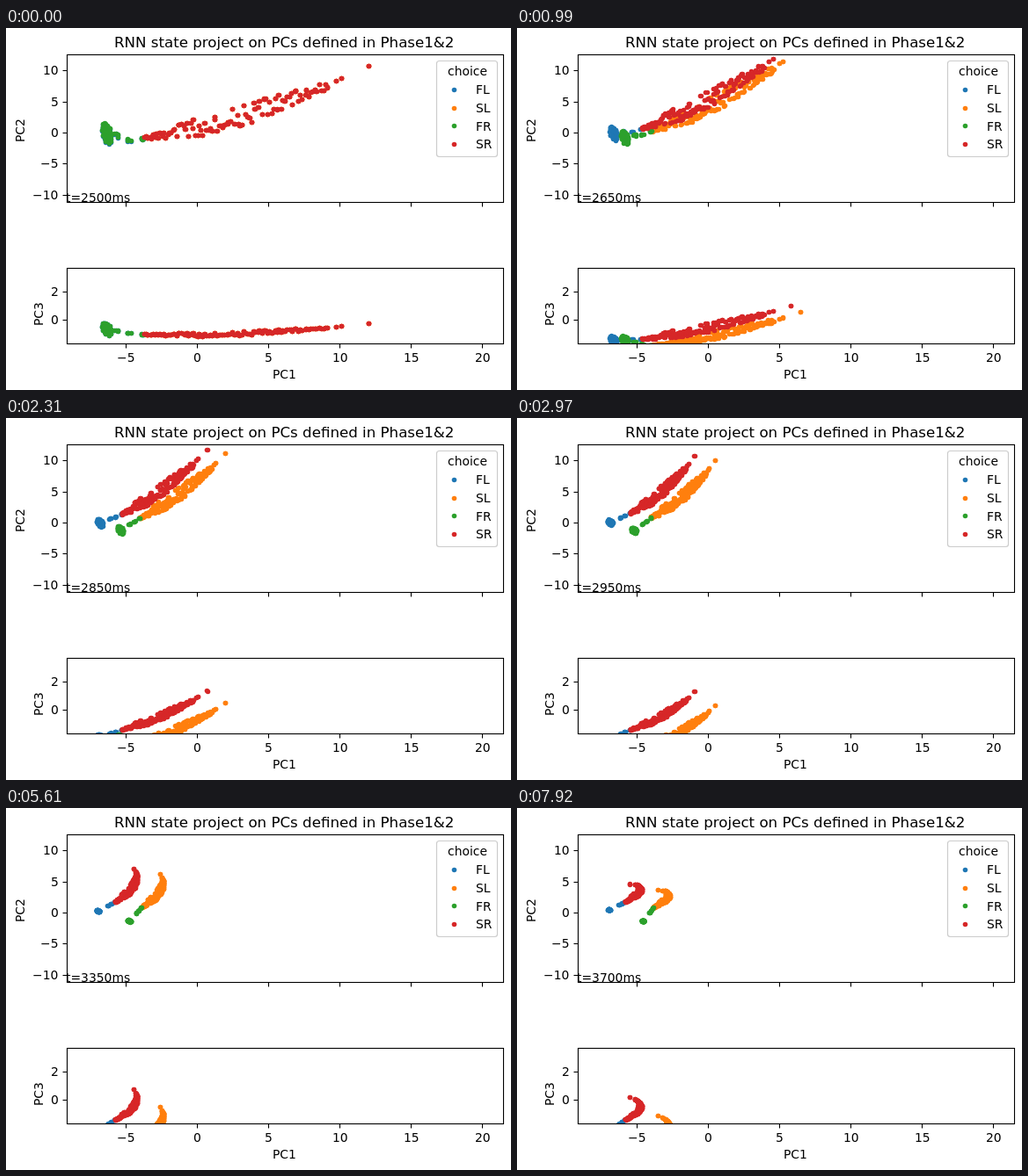
Write an HTML page with a canvas that moves like this. It is 574 px wide and 412 px high and loops after 8 s.

```html
<!DOCTYPE html>
<html lang="en">
<head>
<meta charset="utf-8">
<title>RNN state projection</title>
<style>
  html, body { margin: 0; width: 574px; height: 412px; overflow: hidden; background: #fff; }
  canvas { display: block; }
</style>
</head>
<body>
<canvas id="stage" width="574" height="412"></canvas>
<script>
const ctx = document.getElementById('stage').getContext('2d');
const LOOP = 8000, STEP = 330;
const FONT = '13.89px "DejaVu Sans", sans-serif';
const TITLE_FONT = '16.67px "DejaVu Sans", sans-serif';
const COLORS = { FL: '#1f77b4', SL: '#ff7f0e', FR: '#2ca02c', SR: '#d62728' };
const LEFT = 69.5, WIDTH = 496;
const TOP_AXES = { y: 30.5, h: 168 }, LOW_AXES = { y: 273.5, h: 86 };

let seed = 7;
function random() {
  seed = (seed * 16807) % 2147483647;
  return seed / 2147483647;
}
const signed = () => random() * 2 - 1;
const times = (count, make) => Array.from({ length: count }, (_, i) => make(i));

const mix = (a, b, w) => a + (b - a) * w;
const mixPoints = (a, b, w) => a.map((value, i) => mix(value, b[i], w));
// Parabola through a, b, c at u = 0, .5, 1
const curve = (a, b, c, u) => a * (2 * u - 1) * (u - 1) + 4 * b * u * (1 - u) + c * u * (2 * u - 1);

// u runs along a band, v is the deviation across it: a leaf shape with a few far points
const bandPoints = times(100, i => .82 * ((i + random()) / 100) ** 1.1)
  .concat(.855, .88, 1)
  .flatMap(u => {
    const v = u > .85 ? 0 : signed() * 12 * Math.sin(Math.PI * u ** .8);
    const drift = u > .85 ? 0 : .015;
    return times(2, () => ({ u, v, du: signed() * drift, dv: signed() }));
  });
const blobPoints = times(70, () => {
  const angle = random() * Math.PI * 2, radius = Math.sqrt(random());
  return [radius * Math.cos(angle), radius * Math.sin(angle)];
});
const tailPoints = times(12, i => [(i % 3 + random() * .3) / 2.3, signed()]);

// All points are [x, y in the PC2 plot, y in the PC3 plot]
function clusters(k) {
  const settle = (from, to, rate) => to + (from - to) * rate ** k;

  const start = [settle(157, 123, .83), settle(125, 107, .75), settle(349, 355, .5)];
  const middle = [settle(284.5, 138, .845), .9 * k + settle(95, 71, .5), .35 * k + settle(347, 332, .75)];
  const end = [settle(412, 118, .87), settle(6, 162, .97) + 37 * .3 ** k, 1.3 * k + settle(336, 298, .72)];
  const spread = [settle(0, .2, .9), settle(1, .1, .91), .55 * .93 ** k - .35 * .4 ** k];
  const loose = settle(.1, 1, .6);

  const rightBand = bandPoints.map(({ u, v, du, dv }) => {
    const s = Math.max(0, u + du * loose), d = v + dv * loose;
    return start.map((a, i) => curve(a, middle[i], end[i], s) + d * spread[i]);
  });
  const apart = [33, 7, 22].map(distance => settle(0, distance, .87));
  const shift = point => point.map((value, i) => value + apart[i]);

  // A shrinking blob with a tail that leads to the start of a band
  function blob(center, bandStart) {
    const w = 5 * .94 ** k, h = 12 * .87 ** k;
    const [x, y, z] = center;
    const tailStart = mixPoints(center, bandStart, settle(.2, .62, .9));
    const body = blobPoints.map(([a, b]) => [x + w * (a + .5 * b), y + h * b, z + .6 * h * b]);
    const tail = tailPoints.map(([s, j]) => {
      const [tx, ty, tz] = mixPoints(tailStart, bandStart, s);
      const sag = (5 * Math.sin(Math.PI * s) + 2 * j) * .7 ** k;
      return [tx, ty + sag, tz + sag * .2];
    });
    return body.concat(tail);
  }

  return {
    FL: blob([settle(115, 105, .8), 121 - .2 * k, settle(343, 368, .8)], start),
    SL: rightBand.map(shift),
    FR: blob([settle(115, 147, .91), settle(120, 129, .75), settle(343, 370, .82)], shift(start)),
    SR: rightBand
  };
}

// Markers sit on whole pixels
function dot(x, y) {
  ctx.beginPath();
  ctx.arc(Math.floor(x) + .5, Math.floor(y) + .5, 2.78, 0, Math.PI * 2);
  ctx.fill();
}

// Text starts on a whole pixel; align is the share of its width left of x
function text(string, x, y, align = .5, font = FONT) {
  ctx.font = font;
  ctx.fillStyle = '#000';
  ctx.fillText(string, Math.round(x - ctx.measureText(string).width * align), y);
}

function verticalText(string, x, y) {
  ctx.save();
  ctx.translate(x, y);
  ctx.rotate(-Math.PI / 2);
  text(string, 0, 0);
  ctx.restore();
}

function line(x0, y0, x1, y1) {
  ctx.beginPath();
  ctx.moveTo(x0, y0);
  ctx.lineTo(x1, y1);
  ctx.stroke();
}

const label = value => String(value).replace('-', '\u2212');

function drawAxes({ y, h }, zero, scale, ticks, withLabels) {
  ctx.strokeStyle = '#000';
  ctx.lineWidth = 1.1;
  ctx.strokeRect(LEFT, y, WIDTH, h);
  for (const value of ticks) {
    const ty = Math.floor(zero - value * scale) + .5;
    line(LEFT - 5, ty, LEFT, ty);
    text(label(value), 59.5, ty + 4.5, 1);
  }
  for (let value = -5; value <= 20; value += 5) {
    const tx = Math.floor(217.5 + value * 16.2) + .5;
    line(tx, y + h, tx, y + h + 5);
    if (withLabels) text(label(value), tx, 380);
  }
}

function drawDots(axes, dots, coordinate) {
  ctx.save();
  ctx.beginPath();
  ctx.rect(LEFT, axes.y, WIDTH, axes.h);
  ctx.clip();
  for (const name in COLORS) {
    ctx.fillStyle = COLORS[name];
    for (const point of dots[name]) dot(point[0], point[coordinate]);
  }
  ctx.restore();
}

function drawLegend() {
  ctx.fillStyle = 'rgba(255,255,255,.8)';
  ctx.strokeStyle = '#ccc';
  ctx.lineWidth = 1.2;
  ctx.beginPath();
  ctx.roundRect(489.5, 37.5, 69, 109, 3);
  ctx.fill();
  ctx.stroke();
  text('choice', 524.3, 54);
  Object.keys(COLORS).forEach((name, i) => {
    const y = 70.5 + i * 20.7;
    ctx.fillStyle = COLORS[name];
    dot(509, y);
    text(name, 534, Math.round(y + 4.7), 0);
  });
}

function draw(step) {
  const dots = clusters(step);
  ctx.fillStyle = '#fff';
  ctx.fillRect(0, 0, 574, 412);
  drawDots(TOP_AXES, dots, 1);
  drawDots(LOW_AXES, dots, 2);
  drawAxes(TOP_AXES, 119.5, 7.08, [-10, -5, 0, 5, 10], false);
  drawAxes(LOW_AXES, 332.5, 16, [0, 2], true);
  text('RNN state project on PCs defined in Phase1&2', 316.5, 22, .5, TITLE_FONT);
  text('PC1', 316.5, 399);
  verticalText('PC2', 21, 117);
  verticalText('PC3', 42, 326);
  text(`t=${2500 + 50 * step}ms`, 68, 198, 0);
  drawLegend();
}

let shown = -1;
function frame() {
  const step = Math.floor((performance.now() % LOOP) / STEP);
  if (step !== shown) draw(shown = step);
  requestAnimationFrame(frame);
}
frame();
</script>
</body>
</html>
```
